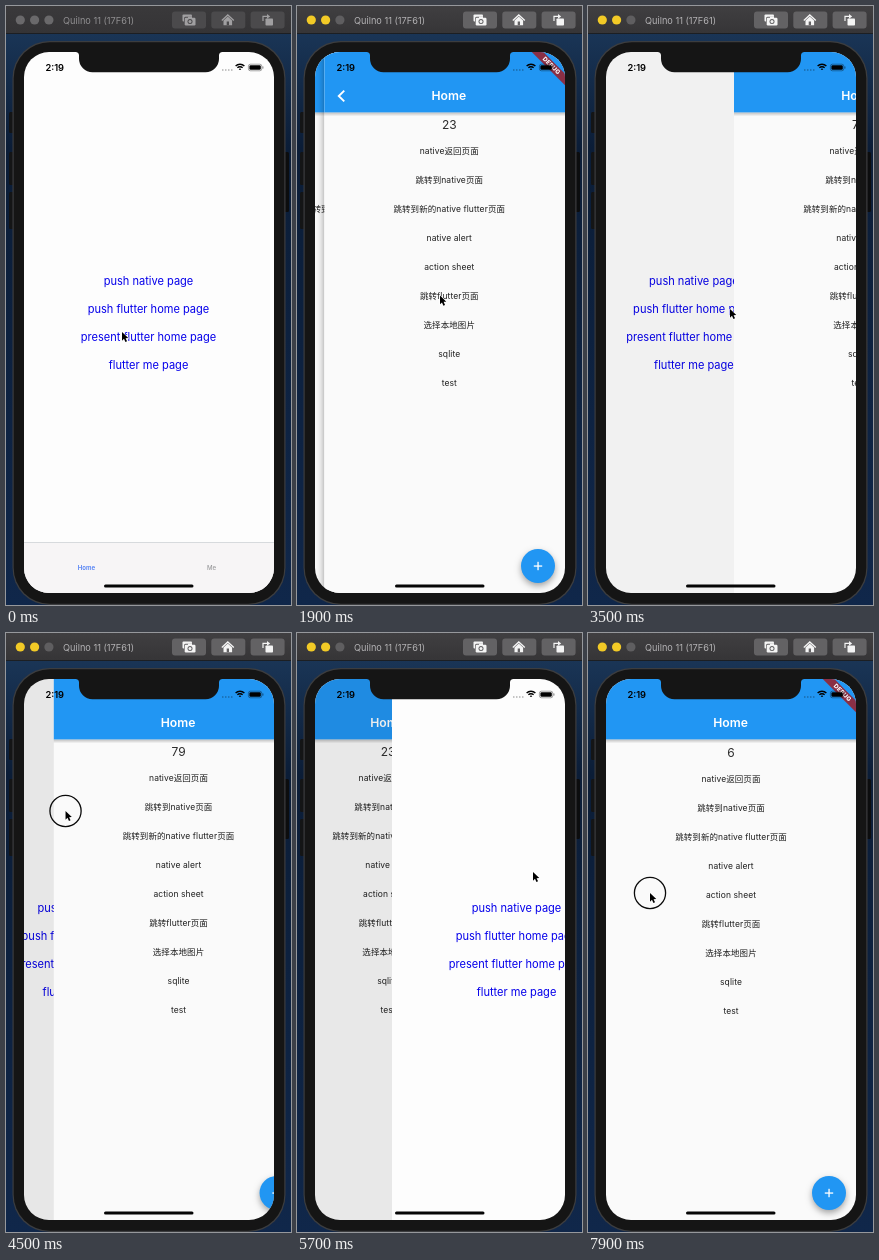
Animation of 285x599 px, one loop 8 s. Source, as an HTML page with a canvas:

```html
<!DOCTYPE html>
<html lang="en">
<head>
<meta charset="utf-8">
<title>Page navigation</title>
<style>
html, body { margin: 0; width: 100%; height: 100%; overflow: hidden; background: #0b1f38; }
canvas { display: block; width: 285px; height: 599px; }
</style>
</head>
<body>
<canvas id="c"></canvas>
<script>
const W = 285, H = 599, LOOP = 8000, STEP = 100;
const X0 = 18, Y0 = 46, SW = 250, SH = 541, BAR = 60.4;
const BLUE = '#2196f3', SHELL = '#151515';
const FONT = 'Inter, "Noto Sans CJK SC", "Noto Sans CJK", "Noto Sans", sans-serif';
const ROWS = ['native返回页面', '跳转到native页面', '跳转到新的native flutter页面', 'native alert',
  'action sheet', '跳转flutter页面', '选择本地图片', 'sqlite', 'test'];
const LINKS = ['push native page', 'push flutter home page', 'present flutter home page', 'flutter me page'];

const canvas = document.getElementById('c');
const dpr = window.devicePixelRatio || 1;
canvas.width = W * dpr;
canvas.height = H * dpr;
const g = canvas.getContext('2d');

// Gestures: a pointer waits at x, y; a swipe moves it by dx and its page by `pull`.
const tap = (start, x, y) => ({ start, end: start + 200, x, y, dx: 0, press: true });
const hover = (start, x, y) => ({ start, end: start, x, y, dx: 0 });
const swipe = (start, end, x, y, dx, pull) => ({ start, end, x, y, dx, pull, press: true });

const closeExtra = swipe(4350, 4750, 30, 178, 210, 210);
const closeNative = swipe(5500, 5700, 29, 239, 207, 77);
const closeInner = swipe(6600, 7100, 43, 241, 158, 158);
const GESTURES = [tap(100, 116, 326), hover(1000, 133, 157), tap(1450, 143, 290), tap(2250, 143, 172),
  tap(3200, 142, 303), closeExtra, closeNative, closeInner, swipe(7700, 8100, 28, 260, 136, 0)];

const between = (t, a, b) => t >= a && t < b;
const clamp = v => Math.max(0, Math.min(1, v));
const easeOut = p => 1 - Math.pow(1 - clamp(p), 3);
const smooth = p => p * p * (3 - 2 * p);
const dragged = (s, t) => Math.pow(clamp((t - s.start) / (s.end - s.start)), 2);

// Offset of a page: slides in after `start`, follows the swipe, then glides out.
function slide(t, start, dur, s) {
  if (t < s.start) return SW * (1 - easeOut((t - start) / dur));
  if (t < s.end) return s.pull * dragged(s, t);
  return s.pull + (SW - s.pull) * easeOut((t - s.end) / 300);
}

function pointerAt(t) {
  const i = Math.max(0, GESTURES.findLastIndex(s => t >= s.start));
  const a = GESTURES[i], b = GESTURES[i + 1];
  const x = a.x + a.dx * dragged(a, t);
  if (!b || t < a.end) return { x, y: a.y, press: a.press && between(t, a.start, a.end) };
  const p = smooth(clamp(((t - a.end) / (b.start - a.end) - 0.4) / 0.5));
  return { x: x + (b.x - x) * p, y: a.y + (b.y - a.y) * p, press: false };
}

function rect(x, y, w, h, color) {
  g.fillStyle = color;
  g.fillRect(x, y, w, h);
}

function round(x, y, w, h, r, color) {
  g.beginPath();
  g.roundRect(x, y, w, h, r);
  g.fillStyle = color;
  g.fill();
}

function disc(x, y, r, color) {
  g.beginPath();
  g.arc(x, y, r, 0, Math.PI * 2);
  g.fillStyle = color;
  g.fill();
}

function path(points) {
  g.beginPath();
  points.forEach(p => g.lineTo(...p));
}

function shape(points, color) {
  path(points);
  g.fillStyle = color;
  g.fill();
}

function line(points, color, width) {
  path(points);
  g.strokeStyle = color;
  g.lineWidth = width;
  g.stroke();
}

function text(s, x, y, size, color, weight = 400, align = 'center', gap = 0) {
  g.font = `${weight} ${size}px ${FONT}`;
  g.letterSpacing = `${gap}px`;
  g.fillStyle = color;
  g.textAlign = align;
  g.textBaseline = 'alphabetic';
  g.fillText(s, x, y + size * 0.36);
}

function at(x, y, draw) {
  g.save();
  g.translate(x, y);
  draw();
  g.restore();
}

function nativePage(tabs) {
  rect(X0, Y0, SW, SH, '#fdfdfd');
  LINKS.forEach((s, i) => text(s, 142.5, 275.3 + i * 27.8, 11.05, '#0600ea'));
  if (!tabs) return;
  rect(X0, 536.5, SW, 51, '#f7f5f6');
  rect(X0, 536, SW, 0.8, '#cfd3d6');
  text('Home', 80.5, 562, 6.1, '#4c7df5', 600);
  text('Me', 205.5, 562, 6.1, '#9a9a9c', 500);
}

function fab() {
  g.save();
  g.shadowColor = 'rgba(0,0,0,.35)';
  g.shadowBlur = 6 * dpr;
  g.shadowOffsetY = 3 * dpr;
  disc(241, 560, 17, BLUE);
  g.restore();
  rect(236.8, 559.4, 8.4, 1.3, '#fff');
  rect(240.4, 555.8, 1.3, 8.4, '#fff');
}

function banner() {
  at(X0 + SW, Y0, () => {
    g.rotate(Math.PI / 4);
    rect(-40, 15.3, 80, 8.2, 'rgba(150,36,50,.9)');
    text('DEBUG', 0, 19, 6.1, '#fff', 800, 'center', 0.2);
  });
}

function homePage({ count, back, lit = -1, dy = 0, button = true, debug = false }) {
  rect(X0, Y0, SW, SH, '#fafafa');
  text(count, 143, 119 + dy, 12, '#2b2b2b');
  ROWS.forEach((s, i) => {
    const y = 145.3 + i * 28.95 + dy;
    if (i === lit) round(77, y - 11, 132, 22, 1, '#ebebeb');
    text(s, 143, y, 8.5, '#1f1f1f', 400, 'center', 0.08);
  });
  const bottom = Y0 + BAR;
  const sh = g.createLinearGradient(0, bottom, 0, bottom + 4);
  sh.addColorStop(0, 'rgba(0,0,0,.24)');
  sh.addColorStop(1, 'rgba(0,0,0,0)');
  rect(X0, bottom, SW, 4, sh);
  rect(X0, Y0, SW, BAR, BLUE);
  text('Home', 142.5, 89.8, 12.2, '#fff', 600);
  if (back) line([[38, 84.6], [32.5, 90], [38, 95.4]], '#fff', 1.9);
  if (button) fab();
  if (debug) banner();
}

function edgeShadow(edge, width, alpha) {
  for (let i = 0; i < width; i++) {
    rect(edge - i - 1, Y0, 1, SH, `rgba(0,0,0,${alpha * Math.pow(1 - i / width, 3)})`);
  }
}

// Stack one page over another at horizontal offset x.
function stack(x, under, over, inner) {
  if (x >= SW) return under();
  if (x <= 0) return over();
  const covered = 1 - x / SW, edge = X0 + x;
  at(-(inner ? SW / 3 : SW * 0.3) * covered, 0, under);
  if (inner) edgeShadow(edge, 12, 0.2);
  else rect(X0, Y0, SW, SH, `rgba(0,0,0,${0.1 * covered})`);
  g.save();
  g.beginPath();
  g.rect(edge, Y0, SW, SH);
  g.clip();
  at(x, 0, over);
  g.restore();
}

function flutterPages(t) {
  const x = slide(t, 1600, 450, closeInner);
  const pushing = x > 0 && x < SW && t < closeInner.start;
  stack(x,
    () => homePage({ count: '6', lit: between(t, 1450, 1800) ? 5 : -1, dy: t >= 7800 ? 1 : 0, button: !pushing }),
    () => homePage({ count: '23', back: true, lit: between(t, 2250, 2900) ? 1 : -1, button: !pushing }),
    true);
  if (pushing) fab();
  banner();
}

function screen(t) {
  const rise = SH * (1 - easeOut((t - 300) / 500));
  if (rise > 0) {
    nativePage(true);
    if (rise < SH) at(0, rise, () => flutterPages(t));
    return;
  }
  const native = slide(t, 2465, 500, closeNative);
  const extra = slide(t, 3400, 500, closeExtra);
  stack(native, () => flutterPages(t), () =>
    stack(extra, () => nativePage(false), () => homePage({ count: '79', debug: true })));
}

function statusBar() {
  text('2:19', 48.7, 61.3, 9.3, '#000', 600);
  for (let i = 0; i < 4; i++) disc(216.8 + i * 3, 64, 0.8, 'rgba(0,0,0,.4)');
  g.strokeStyle = '#000';
  g.lineWidth = 1.4;
  for (let r = 1.2; r < 7; r += 2.5) {
    g.beginPath();
    g.arc(234, 64.4, r, -Math.PI * 0.75, -Math.PI * 0.25);
    g.stroke();
  }
  g.beginPath();
  g.roundRect(242.4, 58.2, 13.4, 6.6, 2);
  g.strokeStyle = 'rgba(0,0,0,.5)';
  g.lineWidth = 0.7;
  g.stroke();
  round(243.4, 59.2, 11.4, 4.6, 1.2, '#000');
  round(256.5, 60.3, 0.9, 2.4, 0.4, 'rgba(0,0,0,.5)');
}

function backdrop() {
  const sky = g.createLinearGradient(0, 27, 0, H);
  sky.addColorStop(0, '#1a3556');
  sky.addColorStop(0.2, '#0b1d37');
  sky.addColorStop(1, '#10274a');
  rect(0, 0, W, H, sky);
}

function phone() {
  round(3, 106, 6, 21, 1.5, '#141516');
  round(3, 146, 6, 33, 1.5, '#141516');
  round(3, 186, 6, 37, 1.5, '#141516');
  round(277, 146, 6, 60, 1.5, '#0c0d0e');
  round(6.5, 35, 273, 564, 37, '#3c3d3f');
  round(7.7, 36.2, 270.6, 561.6, 36, SHELL);
}

function notch() {
  const l = 73, r = 213, top = Y0, bottom = 66.2, ear = 3.6, bend = 13.5;
  g.beginPath();
  g.moveTo(l - ear, top - 1);
  g.lineTo(l - ear, top);
  g.arcTo(l, top, l, top + ear, ear);
  g.arcTo(l, bottom, l + bend, bottom, bend);
  g.arcTo(r, bottom, r, bottom - bend, bend);
  g.lineTo(r, top + ear);
  g.arcTo(r, top, r + ear, top, ear);
  g.lineTo(r + ear, top - 1);
  g.fillStyle = SHELL;
  g.fill();
}

function cameraIcon(ink, face) {
  round(176.5, 8.5, 9.5, 7, 1, ink);
  round(178, 10.7, 12, 9, 1.5, face);
  round(178.7, 11.8, 10.8, 7.6, 1.2, ink);
  rect(182, 10.6, 4, 2, ink);
  disc(184, 15.6, 2.5, face);
  disc(184, 15.6, 1.5, ink);
}

function houseIcon(ink, face) {
  line([[215.8, 14.6], [221.8, 9], [227.8, 14.6]], ink, 1.3);
  shape([[217.5, 14.4], [221.8, 10.6], [226.1, 14.4], [226.1, 19.2], [217.5, 19.2]], ink);
  rect(220.7, 15.5, 2.3, 3.7, face);
}

function rotateIcon(ink) {
  round(259.5, 12.5, 7.5, 7, 0.8, ink);
  line([[257, 15], [257, 10.4], [262, 10.4]], ink, 1.2);
  shape([[261, 8], [264.2, 10.4], [261, 12.8]], ink);
}

function toolbar(active) {
  const bar = g.createLinearGradient(0, 0, 0, 27);
  bar.addColorStop(0, active ? '#403f41' : '#3a393b');
  bar.addColorStop(1, active ? '#363537' : '#353436');
  rect(0, 0, W, 27.5, bar);
  rect(0, 27, W, 0.8, '#19191b');
  for (let i = 0; i < 3; i++) {
    disc(14.3 + i * 14.3, 14, 4.6, !active ? '#6a696b' : i < 2 ? '#f2ca26' : '#5f5e60');
  }
  text('Quilno 11 (17F61)', 57, 14.2, 9.2, active ? '#b3b2b4' : '#908f91', 400, 'left');
  const face = active ? '#636264' : '#4b4a4c', ink = active ? '#f4f4f4' : '#a09fa1';
  for (let i = 0; i < 3; i++) round(166 + i * 39.3, 5.5, 34, 17, 3, face);
  cameraIcon(ink, face);
  houseIcon(ink, face);
  rotateIcon(ink);
}

function pointer(t) {
  const { x, y, press } = pointerAt(t);
  if (press) {
    g.beginPath();
    g.arc(x, y, 15.6, 0, Math.PI * 2);
    g.strokeStyle = '#0a0a0a';
    g.lineWidth = 1.3;
    g.stroke();
  }
  at(x, y, () => {
    g.scale(0.9, 0.9);
    g.lineJoin = 'round';
    const arrow = [[0, 0], [0, 9.6], [2.2, 7.6], [3.8, 11.2], [5.6, 10.4], [4, 6.9], [7, 6.8], [0, 0]];
    line(arrow, '#fff', 1.3);
    shape(arrow, '#000');
  });
}

function draw(t) {
  g.setTransform(dpr, 0, 0, dpr, 0, 0);
  backdrop();
  phone();
  g.save();
  g.beginPath();
  g.roundRect(X0, Y0, SW, SH, 25);
  g.clip();
  screen(t);
  statusBar();
  g.restore();
  notch();
  round(98, 578.6, 89.5, 3, 1.5, '#050505');
  toolbar(t >= 100);
  pointer(t);
}

let start = null;
function frame(now) {
  if (start === null) start = now;
  const t = (now - start) % LOOP;
  draw(Math.floor(t / STEP) * STEP);
  requestAnimationFrame(frame);
}
draw(0);
requestAnimationFrame(frame);
</script>
</body>
</html>
```
